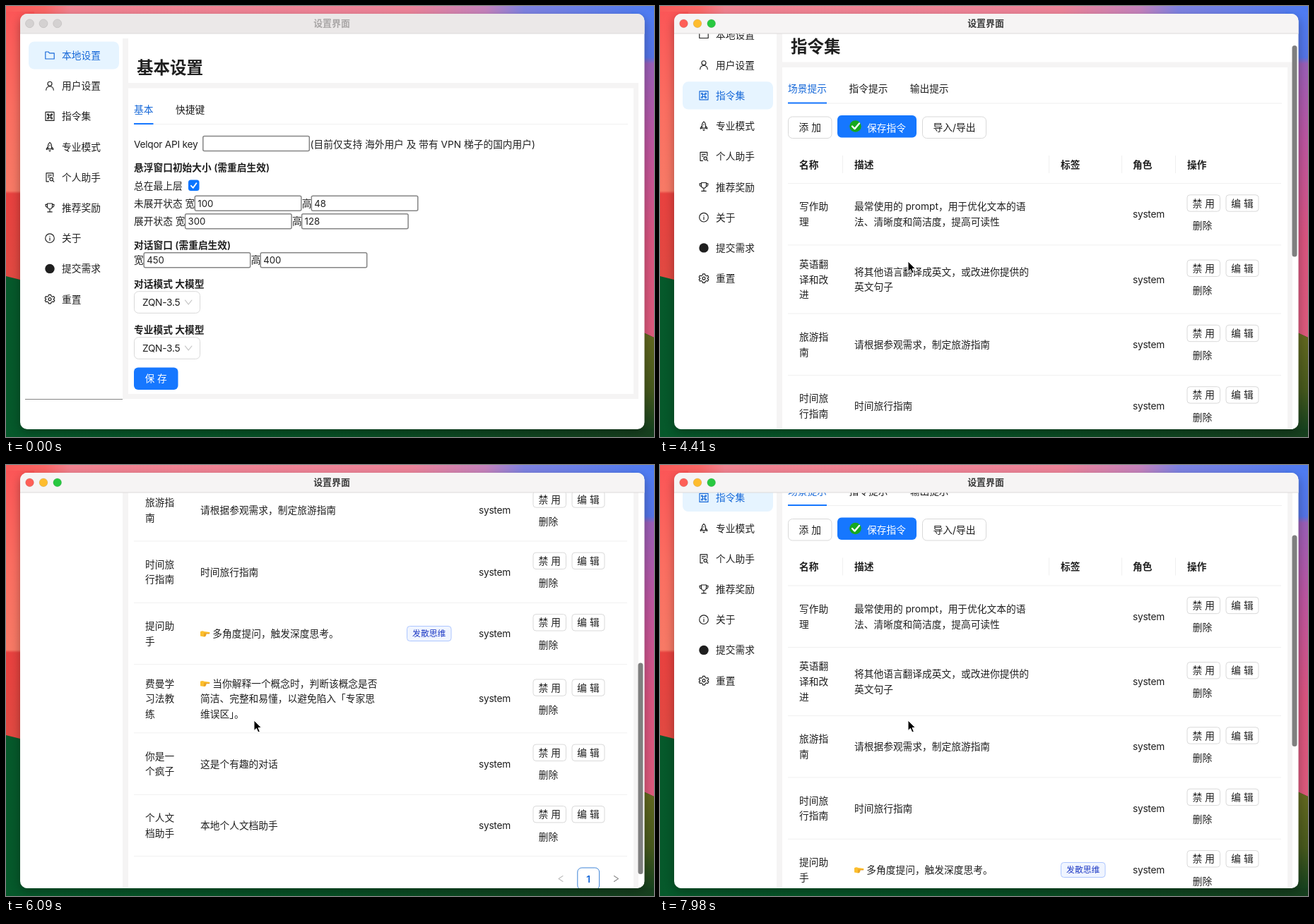
An HTML page for the animation above (8000 ms loop, 917 by 611 pixels).

```html
<!DOCTYPE html>
<html lang="zh-CN">
<head>
<meta charset="utf-8">
<title>设置界面</title>
<style>
  html, body { margin: 0; width: 100%; height: 100%; overflow: hidden; }
  svg { display: block; width: 100%; height: 100%; font: 13.72px Inter, "Noto Sans CJK SC", sans-serif; }
  text { fill: #1f1f1f; white-space: pre; }
  .bold { font-weight: 600; }
  .mid { text-anchor: middle; }
  .latin { letter-spacing: -.02em; }
  .white { fill: #fff; }
  .blue { fill: #1668d8; }
  .icon { fill: none; stroke-width: 1.15; stroke-linejoin: round; stroke-linecap: round; }
</style>
</head>
<body>
<svg id="stage" viewBox="0 0 917 611"></svg>
<script>
const LOOP = 8000, STEP = 70;
const PAGE_SWITCH = 2730, ACTIVATE = 840, HOVER = 1890;
const BLUE = '#1677ff', LINE = '#f0f0f0';

const text = (x, y, s, cls = '', size = 13.72) =>
  `<text x="${x}" y="${y + size * .37}" class="${cls}" font-size="${size}">${s}</text>`;
const rect = (x, y, w, h, fill, rx = 0, stroke = 'none', extra = '') =>
  `<rect x="${x}" y="${y}" width="${w}" height="${h}" fill="${fill}" rx="${rx}" stroke="${stroke}" ${extra}/>`;
const path = (d, stroke, width = 1, fill = 'none') =>
  `<path d="${d}" stroke="${stroke}" stroke-width="${width}" fill="${fill}" stroke-linejoin="round" stroke-linecap="round"/>`;
const outlined = (x, y, w, h, label, rx = 6) =>
  rect(x, y, w, h, '#fff', rx, '#d9d9d9') + text(x + w / 2, y + h / 2, label, 'mid');

/* ---------- wallpaper ---------- */
const stops = list => list.map(([o, c]) => `<stop offset="${o}" stop-color="${c}"/>`).join('');
const wallpaper = `
  <defs>
    <linearGradient id="top">${stops([[0, '#fb5a58'], [.06, '#fb6766'], [.1, '#f28391'], [.62, '#ee8499'],
      [.74, '#c683bd'], [.8, '#7f83e2'], [1, '#4d7bf2']])}</linearGradient>
    <linearGradient id="left" x2="0" y2="1">${stops([[0, '#fb5657'], [.35, '#fb6e61'], [.66, '#f77a66'],
      [.67, '#e8413f'], [1, '#e04a42']])}</linearGradient>
    <linearGradient id="right" x2="0" y2="1">${stops([[0, '#4f7cf2'], [.14, '#5474e6'], [.16, '#9a5fb8'],
      [.4, '#bd559f'], [.7, '#d9547f'], [1, '#dd5a7c']])}</linearGradient>
    <linearGradient id="grass">${stops([[0, '#06592b'], [.5, '#075226'], [1, '#173f1e']])}</linearGradient>
    <linearGradient id="olive" x2="0" y2="1">${stops([[0, '#676a20'], [.6, '#47591d'], [1, '#17431f']])}</linearGradient>
    <filter id="shadow" x="-10%" y="-10%" width="120%" height="120%"><feGaussianBlur stdDeviation="7"/></filter>
    <clipPath id="window"><rect x="20" y="11" width="883.5" height="589" rx="10"/></clipPath>
  </defs>
  ${rect(0, 0, 917, 611, 'url(#grass)')}
  ${rect(0, 0, 917, 40, 'url(#top)')}
  <path d="M0 8H40V393L0 383Z" fill="url(#left)"/>
  <path d="M885 8H917V470L885 455Z" fill="url(#right)"/>
  <path d="M885 455L917 470V600H885Z" fill="url(#olive)"/>
  ${rect(20, 16, 883.5, 588, '#000', 10, 'none', 'filter="url(#shadow)" opacity=".32"')}`;

/* ---------- sidebar ---------- */
const menu = [
  ['本地设置', 'M.8 2H5L6.6 3.8H13.2V12H.8Z'],
  ['用户设置', 'M10 4A3 3 0 1 1 4 4A3 3 0 1 1 10 4M1.7 13C2 6 12 6 12.3 13'],
  ['指令集', 'M1 1H13V13H1ZM5.4 5.4H8.6V8.6H5.4ZM5.4 5.4H4.4A1 1 0 1 1 5.4 4.4ZM8.6 5.4V4.4A1 1 0 1 1 9.6 5.4ZM8.6 8.6H9.6A1 1 0 1 1 8.6 9.6ZM5.4 8.6V9.6A1 1 0 1 1 4.4 8.6Z'],
  ['专业模式', 'M4.5 10V5Q4.8 2.2 7 .8Q9.2 2.2 9.5 5V10ZM4.5 7L2.3 9.5V11L4.5 10M9.5 7L11.7 9.5V11L9.5 10M6 12.2L7 13.4L8 12.2M7 4.6V5.4'],
  ['个人助手', 'M5.5 13H2V1H11.8V6.2M4.5 4H9.3M4.5 6.5H6.3M11.4 9.8A2.2 2.2 0 1 1 7 9.8A2.2 2.2 0 1 1 11.4 9.8M10.8 11.4L12.8 13.4'],
  ['推荐奖励', 'M3.5 1H10.5V5.5Q10.2 8.6 7 8.8Q3.8 8.6 3.5 5.5ZM3.5 2.4H1Q1 6 3.6 6.3M10.5 2.4H13Q13 6 10.4 6.3M7 8.8V12.8M3.8 12.9H10.2'],
  ['关于', 'M13.3 7A6.3 6.3 0 1 1 .7 7A6.3 6.3 0 1 1 13.3 7M7 6.3V10M7 4V4.2'],
  ['提交需求', ''],
  ['重置', 'M5.5 .8H8.5L9.1 2.7L10.8 3.6L12.6 3L13.8 5.4L12.3 6.8V7.4L13.8 8.7L12.6 11L10.8 10.4L9.1 11.4L8.5 13.2H5.5L4.9 11.4L3.2 10.4L1.4 11L.2 8.7L1.7 7.4V6.8L.2 5.4L1.4 3L3.2 3.6L4.9 2.7ZM9 7A2 2 0 1 1 5 7A2 2 0 1 1 9 7']
];
const sidebar = menu.map(([label, icon], i) => {
  const y = 70 + i * 43.2;
  const mark = icon ? `<path class="icon" id="icon${i}" stroke="#1f1f1f" d="${icon}"/>`
                    : '<circle cx="7" cy="7" r="6.7" fill="#1f1f1f"/>';
  return rect(32, y - 19.6, 128, 39.2, 'none', 8, 'none', `id="item${i}"`) +
    `<g transform="translate(55 ${y - 7})">${mark}</g><g id="label${i}">${text(79, y, label)}</g>`;
}).join('');

/* ---------- shared page frame ---------- */
const frame = (title, bottom) =>
  rect(165, 46, 730, bottom - 46, '#f5f4f4') + rect(173, 46, 722, 63, '#fff') +
  rect(173, 116.5, 715, bottom - 123.5, '#fff') +
  rect(27, bottom, 138, 1, '#858585') +
  text(185, 87, title, 'bold', 23.5) + rect(181, 167, 699, 1, LINE);

/* ---------- basic settings page ---------- */
const input = (x, y, value = '') =>
  rect(x, y - 10.5, 150.5, 21, '#fff', 2, '#858585', 'stroke-width="1.5"') + text(x + 4, y, value, '', 13.2);
const sizes = (x, y, label, w, h) =>
  text(181, y, label) + input(x, y, w) + text(x + 151.5, y, '高') + input(x + 165, y, h);
const select = y => rect(181.5, y - 15.3, 93, 30.6, '#fff', 6, '#d9d9d9') +
  text(193, y, 'ZQN-3.5', 'latin') + path(`M253.5 ${y - 3}l4.7 6l4.7 -6`, '#bfbfbf', 1.1);

const basicPage = frame('基本设置', 557) +
  text(181, 146.5, '基本', 'blue') + text(240, 146.5, '快捷键') + rect(181, 166, 27.5, 2, BLUE) +
  text(181, 195.5, 'Velqor API key', 'latin') + input(278.8, 195) +
  text(430.5, 195.5, '(目前仅支持 海外用户 及 带有 VPN 梯子的国内用户)') +
  text(181, 229, '悬浮窗口初始大小 (需重启生效)', 'bold') +
  text(181, 254.5, '总在最上层') + rect(258, 246.5, 15.5, 15.5, '#0a75ff', 3.5) +
  path('M262 254.8L264.8 257.8L269.4 251.2', '#fff', 1.9) +
  sizes(267.3, 279.8, '未展开状态 宽', 100, 48) +
  sizes(253.6, 305.3, '展开状态 宽', 300, 128) +
  text(181, 339, '对话窗口 (需重启生效)', 'bold') +
  sizes(195.2, 360.3, '宽', 450, 400) +
  text(181, 394, '对话模式 大模型', 'bold') + select(420) +
  text(181, 458.8, '专业模式 大模型', 'bold') + select(485) +
  rect(181, 512.5, 62.5, 31.5, BLUE, 6) + text(212.2, 528.3, '保 存', 'mid white');

/* ---------- command list page ---------- */
const rows = [
  ['写作助|理', '最常使用的 prompt，用于优化文本的语|法、清晰度和简洁度，提高可读性'],
  ['英语翻|译和改|进', '将其他语言翻译成英文，或改进你提供的|英文句子'],
  ['旅游指|南', '请根据参观需求，制定旅游指南'],
  ['时间旅|行指南', '时间旅行指南'],
  ['提问助|手', '>多角度提问，触发深度思考。', '发散思维'],
  ['费曼学|习法教|练', '>当你解释一个概念时，判断该概念是否|简洁、完整和易懂，以避免陷入「专家思|维误区」。'],
  ['你是一|个疯子', '这是个有趣的对话'],
  ['个人文|档助手', '本地个人文档助手']
];
const pointer = (x, y) => `<g transform="translate(${x} ${y - 5})">
  <path d="M0 2.2Q3 .6 5.5 2L13 3Q14.2 4 13 5H8.5Q9 6 8.2 6.8Q8.4 8 7.4 8.4Q7 9.6 5 9.4L0 8.6Z" fill="#fcbf2e"/>
  <path d="M5 5H13M5 6.8H8.2M5 8.4H7.4" stroke="#d98a1c" stroke-width=".8"/></g>`;
const lines = (x, cy, content) => content.split('|').map((s, i, all) => {
  const y = cy + (i - (all.length - 1) / 2) * 21.6;
  return s[0] === '>' ? pointer(x, y) + text(x + 17.3, y, s.slice(1)) : text(x, y, s);
}).join('');

let edge = 281;
const tableRows = rows.map(([name, about, tag]) => {
  const height = name.split('|').length === 3 ? 97.1 : 87.4;
  const cy = edge + height / 2;
  edge += height;
  return lines(197, cy, name) + lines(275, cy, about) + text(669, cy, 'system', 'latin') +
    (tag ? rect(567.5, cy - 10.5, 62.5, 21, '#f0f5ff', 4, '#adc6ff') +
      `<g style="--c:0">${text(598.7, cy, tag, 'mid', 11.8).replace('<text', '<text style="fill:#1d39c4"')}</g>` : '') +
    outlined(746, cy - 27.4, 46.5, 23.4, '禁 用', 4) + outlined(801, cy - 27.4, 46, 23.4, '编 辑', 4) +
    text(753.8, cy + 15.7, '删除') + rect(181, edge - .5, 698, 1, LINE);
}).join('');

const listPage = frame('指令集', 1076) +
  text(181, 146.5, '场景提示', 'blue') + text(267.5, 146.5, '指令提示') + text(353.7, 146.5, '输出提示') +
  rect(181, 166, 0, 2, BLUE, 0, 'none', 'id="ink"') +
  outlined(181.5, 186.5, 61.5, 30.5, '添 加') + outlined(371.5, 186.5, 90, 30.5, '导入/导出') +
  rect(251, 184.5, 112, 31.5, BLUE, 6) +
  '<circle cx="276.5" cy="200" r="8.3" fill="#17a81f"/>' + path('M272 200L275.5 203.6L282 196', '#fff', 2.4) +
  text(293, 202, '保存指令', 'white') +
  [[197, '名称'], [275, '描述'], [567, '标签'], [669, '角色'], [746, '操作']]
    .map(([x, s]) => text(x, 254.3, s, 'bold')).join('') +
  [258, 550, 653, 729].map(x => rect(x, 241.5, 1, 25, LINE)).join('') +
  rect(181, 280.5, 698, 1, LINE) + tableRows +
  path('M788 1027.5l-6 4l6 4', '#bfbfbf', 1.1) + path('M860.5 1027.5l6 4l-6 4', '#8c8c8c', 1.1) +
  rect(808.8, 1016, 30.8, 31, '#fff', 6, '#3d83d6') + text(824.2, 1031.5, '1', 'mid bold blue');

/* ---------- assembly ---------- */
document.getElementById('stage').innerHTML = wallpaper + `
  <g clip-path="url(#window)">
    ${rect(20, 11, 884, 589, '#fff')}
    <g id="scroll">
      <g id="basic">${basicPage}</g>
      <g id="list">${listPage}</g>
      ${sidebar}
    </g>
    ${rect(894.5, 40, 7, 299.5, '#7f7f7f', 3.5, 'none', 'id="thumb"')}
    ${rect(20, 11, 884, 28, '#f6f4f4', 0, 'none', 'id="bar"')}${rect(20, 38.5, 884, 1, '#dedcdc')}
    ${[33.5, 53, 72.7].map((x, i) => `<circle id="light${i}" cx="${x}" cy="24.8" r="5.9" stroke-width=".7"/>`).join('')}
    <g id="title">${text(461, 24.3, '设置界面', 'mid bold', 12.9)}</g>
  </g>
  <g id="cursor">
    <path id="arrow" d="M0 0V14.5L3.4 11.4L5.8 17L8.3 16L6 10.5H10.4Z" fill="#000" stroke="#fff" stroke-width="1"/>
    <path id="hand" d="M-1.5 1Q0 -.8 1.5 1V6Q3 4.8 4 6.4Q5.5 5.4 6.4 7Q8.4 6.4 8.6 8.5V11Q8.4 13 7 16H-.5Q-1.6 13.4 -4.2 10.4Q-5.4 8.6 -3.6 8.2L-1.5 9.8ZM1.5 6V9M4 6.6V9M6.4 7.2V9.4M1.6 11.5V14M4.2 11.5V14"
      fill="#fff" stroke="#000" stroke-width="1.1" stroke-linejoin="round"/>
  </g>`;

/* ---------- motion ---------- */
const $ = id => document.getElementById(id);
const clamp = v => Math.max(0, Math.min(1, v));
const smooth = v => v * v * (3 - 2 * v);
const set = (id, name, value) => $(id).setAttribute(name, value);
const show = (id, on) => set(id, 'visibility', on ? 'visible' : 'hidden');
const mix = (a, b, k) => `rgb(${a.map((v, i) => Math.round(v + (b[i] - v) * k))})`;
const DARK = [31, 31, 31], ACCENT = [22, 104, 216];

// Linear interpolation through [time, value] keys
function track(keys, t, column = 1) {
  const next = keys.findIndex(k => k[0] > t);
  if (next < 0) return keys[keys.length - 1][column];
  if (next === 0) return keys[0][column];
  const a = keys[next - 1], b = keys[next];
  return a[column] + (b[column] - a[column]) * (t - a[0]) / (b[0] - a[0]);
}
const scrollKeys = [[4340, 0], [4410, 29.5], [4480, 62], [4550, 92], [4620, 115], [4760, 147], [4970, 167],
  [5250, 167], [5320, 190], [5530, 321], [5670, 385], [5880, 445], [6160, 445], [6230, 459], [6370, 477],
  [7070, 477], [7140, 467], [7350, 385], [7490, 305], [7630, 236], [7770, 176], [7980, 110]];
const cursorKeys = [[350, 440, 598], [490, 408, 438], [770, 408, 438], [980, 234, 190], [1190, 234, 190],
  [1330, 212, 184], [1540, 150, 166], [1750, 119, 160], [2030, 119, 160], [2240, 97, 160],
  [3640, 97, 160], [3850, 235, 275], [4060, 351, 362]];

function colorItem(i, blue) {
  const color = mix(DARK, ACCENT, blue);
  set('icon' + i, 'stroke', color);
  $('label' + i).firstChild.style.fill = color;
}

function draw(t) {
  const active = t >= ACTIVATE, list = t >= PAGE_SWITCH;
  const change = smooth(clamp((t - PAGE_SWITCH) / 320));

  set('bar', 'fill', active ? '#f6f4f4' : '#ebe8e8');
  $('title').firstChild.style.fill = active ? '#3a3a3a' : '#a9a6a6';
  ['#fe5f57', '#febc2e', '#28c840'].forEach((color, i) => {
    set('light' + i, 'fill', active ? color : '#d4d1d1');
    set('light' + i, 'stroke', active ? 'rgba(0,0,0,.14)' : '#bfbcbc');
  });

  show('basic', !list);
  show('list', list);
  set('ink', 'width', list ? 1.5 + 53.5 * change : 0);
  set('item0', 'fill', '#e6f4ff');
  set('item0', 'opacity', 1 - change);
  set('item2', 'fill', list ? '#e6f4ff' : t >= HOVER ? '#f0f0f0' : 'none');
  colorItem(0, 1 - change);
  colorItem(2, change);

  const offset = track(scrollKeys, t);
  set('scroll', 'transform', `translate(0 ${-offset})`);
  set('thumb', 'y', 40 + offset * .5405);
  set('thumb', 'opacity', t < 4410 ? 0 : t < 6930 || t >= 7140 ? 1 : clamp((7090 - t) / 200));

  const x = track(cursorKeys, t, 1), y = track(cursorKeys, t, 2);
  set('cursor', 'transform', `translate(${x} ${y})`);
  show('hand', t >= 350 && x < 160);
  show('arrow', t >= 350 && x >= 160);
}

let start;
function tick(now) {
  start ??= now;
  draw(Math.floor((now - start) % LOOP / STEP) * STEP);
  requestAnimationFrame(tick);
}
draw(0);
requestAnimationFrame(tick);
</script>
</body>
</html>
```
